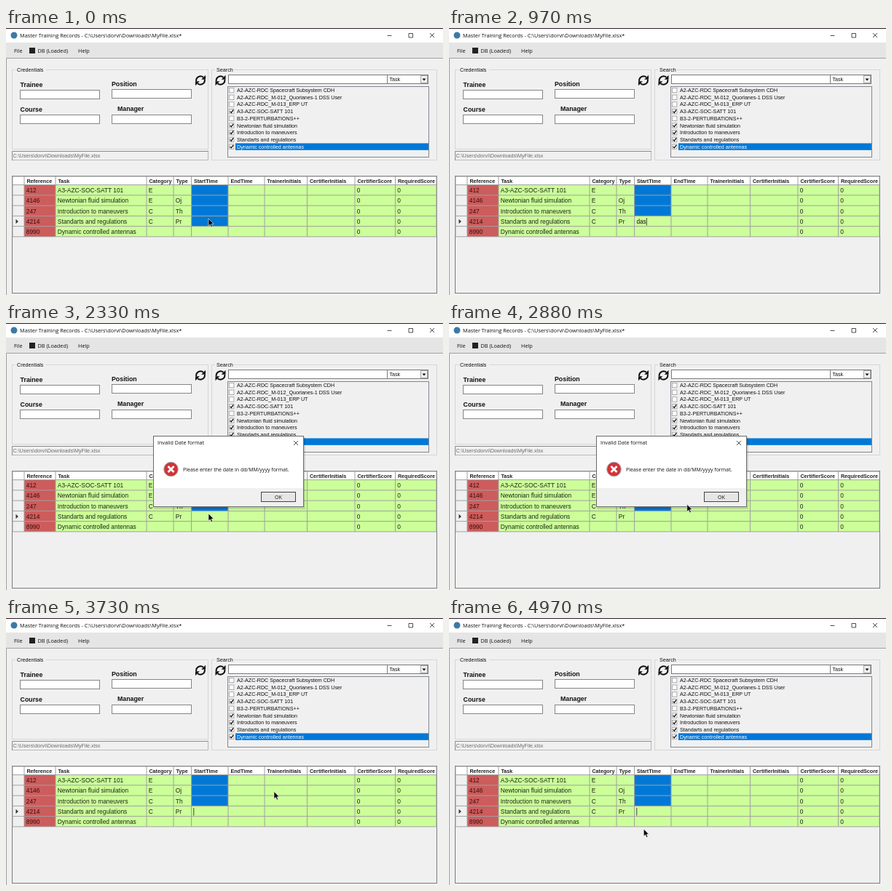
Animation of 600x367 px, one loop 5 s. Source, as an HTML page:

```html
<!DOCTYPE html>
<html lang="en">
<head>
<meta charset="utf-8">
<title>Training records</title>
<style>
  html, body { margin: 0; width: 100%; height: 100%; overflow: hidden; background: #f0f0f0; }
  svg { display: block; width: 600px; height: 367px; }
  text { font-family: "Liberation Sans", Arial, sans-serif; white-space: pre; }
  .ui { font-family: "Open Sans", "Noto Sans", sans-serif; }
  .bold { font-weight: bold; }
</style>
</head>
<body>
<svg id="stage" viewBox="0 0 600 367" xmlns="http://www.w3.org/2000/svg"></svg>
<script>
const LOOP = 5000;
const BLUE = '#0078d7', GREEN = '#ccff99', RED = '#cd5c5c', FACE = '#f0f0f0';
const FILE = 'C:\\Users\\dorvi\\Downloads\\MyFile.xlsx';
const stage = document.getElementById('stage');

function add(tag, attrs, parent = stage) {
  const el = document.createElementNS('http://www.w3.org/2000/svg', tag);
  for (const key in attrs) el.setAttribute(key, attrs[key]);
  return parent.appendChild(el);
}
const group = () => add('g', {});
const rect = (x, y, width, height, fill, parent) => add('rect', { x, y, width, height, fill }, parent);
const frame = (x, y, width, height, fill, stroke, parent) =>
  add('rect', { x: x + .5, y: y + .5, width: width - 1, height: height - 1, fill, stroke }, parent);
const path = (d, stroke, width = 1, parent = stage, fill = 'none') =>
  add('path', { d, stroke, 'stroke-width': width, fill }, parent);

// y is the vertical middle of the line of text
function label(str, x, y, size, cls = '', fill = '#111', parent = stage) {
  const el = add('text', { x, y: y + size * .35, 'font-size': size, class: cls, fill }, parent);
  el.textContent = str;
  return el;
}

function drawWindow() {
  rect(0, 0, 600, 367, FACE);
  rect(0, 0, 600, 20, '#fff');
  rect(0, 0, 600, 1, '#2a1a22');
  add('circle', { cx: 11, cy: 10, r: 4.5, fill: '#3b7aa8' });
  label(`Master Training Records - ${FILE}*`, 19, 10.3, 7.35, 'ui');
  path('M523.5 10.5h6', '#222', .8);
  path('M553 7.5h5.5v5.5h-5.5z', '#222', .8);
  path('M582 7l6 6m0 -6l-6 6', '#222', .8);

  rect(0, 20, 600, 21, '#e6e5e6');
  path('M600 41.5H.5V367', '#a0a0a0');
  label('File', 11, 31, 7.3, 'ui');
  rect(32, 27, 8, 8, '#222');
  label('DB (Loaded)', 43.5, 31, 7.3, 'ui');
  label('Help', 99, 31, 7.3, 'ui');
}

function groupBox(x, y, w, h, title, titleWidth) {
  frame(x, y, w, h, 'none', '#d6d6d6');
  rect(x + 5, y - 2, titleWidth, 5, FACE);
  label(title, x + 7, y + .3, 7.2);
}

function refreshIcon(cx, cy) {
  const g = add('g', { transform: `translate(${cx} ${cy})` });
  for (const turn of [0, 180]) {
    const half = add('g', { transform: `rotate(${turn})` }, g);
    path('M-5.8 1.2A6 6 0 0 1 4 -4.3', '#111', 2, half);
    path('M7 -7.2V-1.2H1.2z', 'none', 0, half, '#111');
  }
}

function drawCredentials() {
  groupBox(8, 57, 270, 110, 'Credentials', 42);
  const fields = [['Trainee', 19.6, 77.8, 19, 85], ['Position', 145, 77.2, 145, 84],
                  ['Course', 19.6, 111.8, 19, 119], ['Manager', 153, 111.4, 145, 119]];
  for (const [name, x, y, boxX, boxY] of fields) {
    label(name, x, y, 8.8, 'bold');
    frame(boxX, boxY, 110, 13, '#fff', '#858585');
  }
  refreshIcon(267, 72);
  frame(8, 169, 270, 13, FACE, '#b8b8b8');
  path('M8.5 182V169.5H278', '#8c8c8c');
  label(FILE, 9.5, 175.3, 7.15, '', '#6d6d6d');
}

function drawSearch() {
  groupBox(282, 57, 310, 125, 'Search', 26);
  refreshIcon(294.5, 72);
  frame(305, 64, 219, 13, '#fff', '#7a7a7a');
  frame(523, 64, 57, 13, '#fff', '#7a7a7a');
  label('Task', 526.5, 70.8, 7.15);
  frame(569, 65, 10, 11, FACE, '#a8a8a8');
  path('M571.5 69.5h5l-2.5 3z', 'none', 0, stage, '#111');

  frame(304, 80, 277, 98, FACE, '#828790');
  const items = ['A2-AZC-RDC Spacecraft Subsystem CDH', 'A2-AZC-RDC_M-012_Quorlanes-1 DSS User',
    'A2-AZC-RDC_M-013_ERP UT', '*A3-AZC-SOC-SATT 101', 'B3-2-PERTURBATIONS++',
    '*Newtonian fluid simulation', '*Introduction to maneuvers',
    '*Standarts and regulations', '*Dynamic controlled antennas'];
  items.forEach((item, i) => {
    const y = 85.6 + i * 9.68, checked = item[0] === '*', last = i === items.length - 1;
    if (last) rect(315, y - 4.6, 265, 9.4, BLUE);
    add('rect', { x: 306.5, y: y - 3.2, width: 6.4, height: 6.4, fill: '#fff', stroke: '#999', 'stroke-width': .8 });
    if (checked) path(`M307.6 ${y}l1.7 1.8l2.9 -4`, '#111', 1.3);
    label(item.replace('*', ''), 317, y, 7.15, '', last ? '#fff' : '#111');
  });
}

const COLS = [9, 25, 68, 193, 230, 254.5, 305, 355, 413.5, 479, 534.5, 591];
const rowTop = i => 215.6 + i * 14.25;

function drawGrid() {
  const top = rowTop(0), bottom = rowTop(5);
  frame(8, 203, 584, 162, FACE, '#7c7c7c');
  rect(9, 204, 582, top - 204, '#fff');
  rect(25, top, 43, bottom - top, RED);
  rect(68, top, 523, bottom - top, GREEN);
  rect(254.5, top, 50.5, rowTop(3) - top, BLUE);
  const startCell = rect(254.5, rowTop(3), 50.5, 14.25, BLUE);

  for (const x of COLS) path(`M${x} 204V${bottom}`, '#a0a0a0');
  path('M9 204H591', '#a0a0a0');
  for (let i = 0; i <= 5; i++) path(`M9 ${rowTop(i)}H591`, '#a0a0a0');

  const heads = ['Reference', 'Task', 'Category', 'Type', 'StartTime', 'EndTime',
    'TrainerInitials', 'CertifierInitials', 'CertifierScore', 'RequiredScore'];
  heads.forEach((head, i) => label(head, COLS[i + 1] + 3.4, 210.6, 7.2, 'bold', '#222'));

  const rows = [['412', 'A3-AZC-SOC-SATT 101', 'E', ''],
    ['4146', 'Newtonian fluid simulation', 'E', 'Oj'],
    ['247', 'Introduction to maneuvers', 'C', 'Th'],
    ['4214', 'Standarts and regulations', 'C', 'Pr'],
    ['8990', 'Dynamic controlled antennas', '', '']];
  rows.forEach((cells, r) => {
    const y = rowTop(r) + 7.6;
    cells.forEach((cell, c) => label(cell, COLS[c + 1] + 2.8, y, 8.4, '', c ? '#1c2414' : '#3a0d0d'));
    for (const c of [9, 10]) label('0', COLS[c] + 2.8, y, 8.4, '', '#1c2414');
  });
  path('M13.5 262.7l3.4 3.2l-3.4 3.2z', 'none', 0, stage, '#333');
  return startCell;
}

function drawDialog() {
  const g = group();
  rect(203, 157, 208, 99, 'rgba(0,0,0,.12)', g);
  frame(202, 155, 207, 98, '#fff', '#6a6a6a', g);
  rect(203, 227, 205, 25, FACE, g);
  label('Invalid Date format', 208, 164.6, 7.15, 'ui', '#111', g);
  path('M395 162l6 6m0 -6l-6 6', '#222', .8, g);
  add('circle', { cx: 226.5, cy: 201, r: 9.8, fill: '#d1343a', stroke: '#a9a9a9' }, g);
  path('M222.5 197l8 8m0 -8l-8 8', '#fff', 2.8, g);
  label('Please enter the date in dd/MM/yyyy format.', 243, 201.2, 7, 'ui', '#111', g);
  frame(350, 232, 48, 14, '#e6e6e6', '#444', g);
  label('OK', 374, 239.2, 7.2, 'ui', '#111', g).setAttribute('text-anchor', 'middle');
  return g;
}

drawWindow();
drawCredentials();
drawSearch();
const startCell = drawGrid();
const typed = label('', 257.5, 266.4, 8.2);
const caret = rect(257.4, 261, .8, 10.5, '#222');
const dialog = drawDialog();
const pointer = path('M0 0V10L2.3 7.9L3.9 11.5L5.6 10.8L4 7.3H7.1z', '#fff', .6, stage, '#000');

const KEYS = [620, 720, 830], DIALOG_OPEN = 1300, DIALOG_CLOSE = 3500, BLINK = 530;
const MOVES = [ // start, end, from, to
  [2580, 3150, [278, 262], [368, 238.5]],
  [3850, 4310, [368, 238.5], [267.3, 290]],
];

function pointerAt(t) {
  let pos = MOVES[0][2];
  for (const [start, end, from, to] of MOVES) {
    if (t < start) break;
    const u = Math.min(1, (t - start) / (end - start)), p = u * u * (3 - 2 * u);
    pos = from.map((v, i) => v + (to[i] - v) * p);
  }
  return pos;
}

const show = (el, on) => el.setAttribute('visibility', on ? 'visible' : 'hidden');

function render(t) {
  const typing = t >= KEYS[0] && t < DIALOG_OPEN;
  const pressed = KEYS.filter(k => t >= k);
  const text = typing ? 'das'.slice(0, pressed.length) : '';
  const since = t - (typing ? pressed[pressed.length - 1] : DIALOG_CLOSE);
  const editing = typing || t >= DIALOG_CLOSE;

  show(startCell, t < KEYS[0]);
  typed.textContent = text;
  caret.setAttribute('x', 257.4 + (text ? typed.getComputedTextLength() + .3 : 0));
  show(caret, editing && Math.floor(since / BLINK) % 2 === 0);
  show(dialog, t >= DIALOG_OPEN && t < DIALOG_CLOSE);
  show(pointer, !typing);
  pointer.setAttribute('transform', `translate(${pointerAt(t).join(' ')})`);
}

const begin = performance.now();
function tick() {
  render((performance.now() - begin) % LOOP);
  requestAnimationFrame(tick);
}
tick();
</script>
</body>
</html>
```
